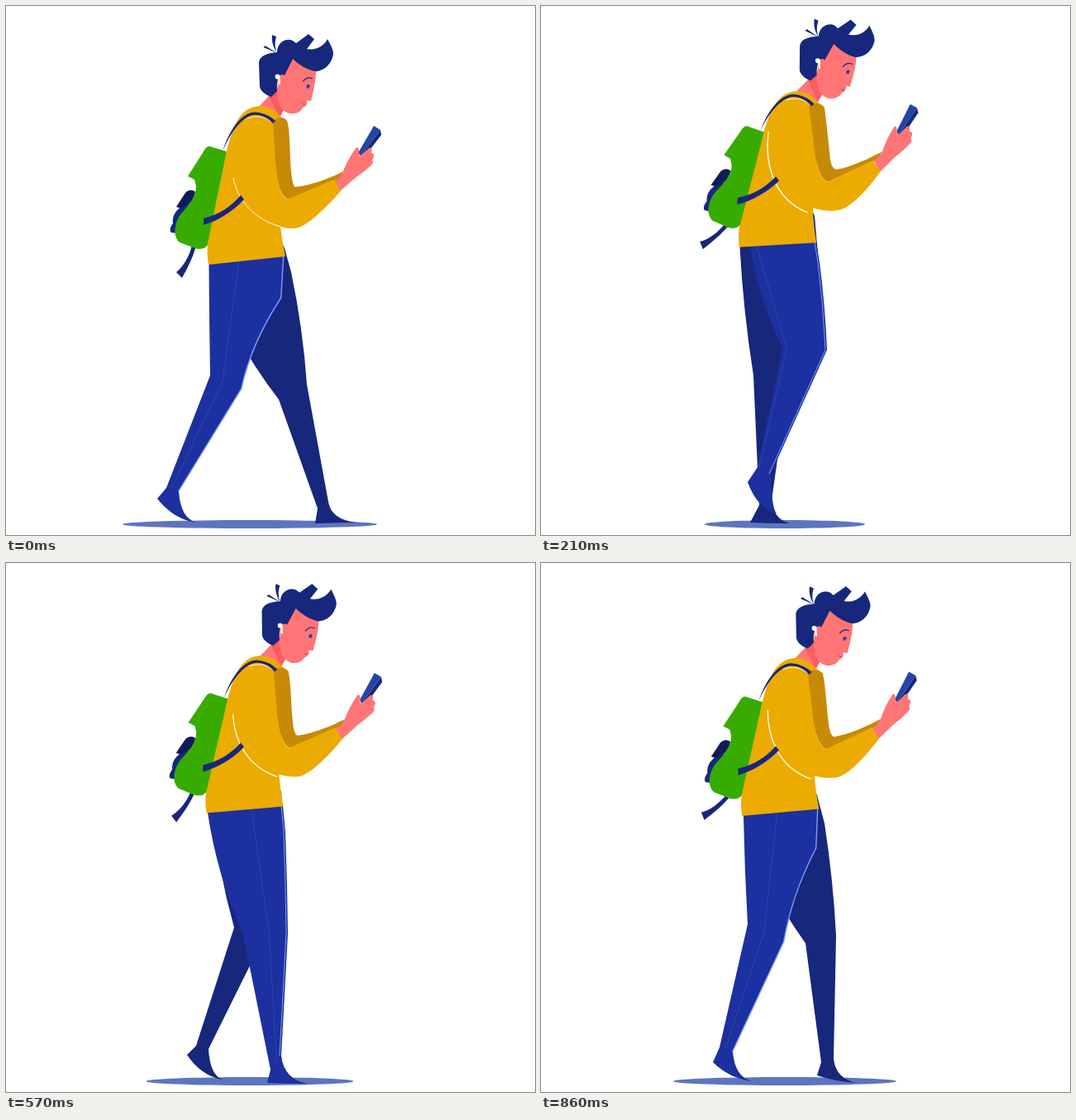
These frames come from a looping animation (640 px wide and 640 px high, 930 ms). An HTML page with a canvas:

```html
<!DOCTYPE html>
<html lang="en">
<head>
<meta charset="utf-8">
<title>Walking with a phone</title>
<style>
  html, body { margin: 0; width: 100%; height: 100%; overflow: hidden; background: #fff; }
  canvas { display: block; width: 100vw; height: 100vh; }
</style>
</head>
<body>
<canvas id="stage" width="640" height="640"></canvas>
<script>
const ctx = document.getElementById('stage').getContext('2d');

const LOOP = 930, STEPS = 13, HALF = STEPS / 2;
const starts = [0, 70, 140, 210, 290, 360, 430, 500, 570, 640, 710, 790, 860];

const NAVY = '#17277b', BLUE = '#1c309f', SEAM = '#2843a9', LIGHT = '#7d9dff';
const YELLOW = '#ebab00', OCHRE = '#c68a06', SKIN = '#ff7576', BLUSH = '#ff5b5d';
const GREEN = '#38ab00', PHONE = '#2445a6', DARK = '#101c5a', SHADOW = '#5c75bf';

const mix = (a, b, t) => a + (b - a) * t;
const nums = text => text.split(/[ ,]+/).map(Number);

// Linear interpolation over [time, values] keys.
function track(keys, time) {
  const i = Math.max(1, keys.findIndex(k => k[0] >= time));
  const [t0, a] = keys[i - 1], [t1, b] = keys[i];
  return a.map((v, n) => mix(v, b[n], (time - t0) / (t1 - t0)));
}

function fill(path, color) {
  ctx.fillStyle = color;
  ctx.fill(new Path2D(path));
}

function stroke(path, color, width) {
  ctx.strokeStyle = color;
  ctx.lineWidth = width;
  ctx.lineCap = ctx.lineJoin = 'round';
  ctx.stroke(new Path2D(path));
}

function group(dx, dy, angle, cx, cy, draw) {
  ctx.save();
  ctx.translate(cx + dx, cy + dy);
  ctx.rotate(angle);
  ctx.translate(-cx, -cy);
  draw();
  ctx.restore();
}

// Blends two paths that share the same commands.
function morph(a, b, t) {
  const other = b.match(/[\d.]+/g);
  let i = 0;
  return a.replace(/[\d.]+/g, n => mix(+n, +other[i++], t).toFixed(2));
}

// Pose: back hip, back knee, back ankle, heel, toe, front ankle, front knee,
// front thigh, front hip, then the position of the seam across the leg.
const trailing = nums('245.5,313 247,447 194,583 183,596 230,625 209,587 285,463 333,353 336,303 .4');
const leading = nums('246,313 330,476 377,608 374,626 424,625 390,600 364,458 345,322 337,293 .43');

const nearLeg = [
  [0, trailing],
  [1, nums('244,306 261,437 217,577 206,588 243,622 232,580 304,451 333,333 334,297 .32')],
  [3, nums('253,291 292,415 262,558 250,576 285,614 278,566 346,416 337,310 333,286 .1')],
  [5, nums('247,302 308,446 317,578 311,607 356,626 332,577 359,430 341,312 336,291 .29')],
  [HALF, leading],
  [8, nums('244,302 287,450 320,613 316,629 365,630 333,596 341,448 338,326 335,294 .58')],
  [10, nums('243,291 255,424 261,612 258,625 307,627 280,585 310,446 333,326 333,286 .55')],
  [12, nums('245,306 250,437 216,586 208,604 255,627 232,591 294,458 333,345 335,297 .45')],
  [STEPS, trailing]
];

const farLeg = [
  [0, leading],
  [1, nums('245,306 305,470 340,611 335,629 386,629 353,603 343,458 341,330 335,287 .4')],
  [3, nums('240.5,291 257,447 264,604 253,625 302,626 279,598 300,450 335,300 331,254 .4')],
  [5, nums('245,302 252,447 229,596 217,609 267,628 242,600 305,420 333,340 335,285 .4')],
  [HALF, trailing],
  [8, nums('250,302 276,441 230,584 219,595 262,625 245,588 305,467 336,320 333,277 .4')],
  [10, nums('247,291 290,440 262,582 255,588 295,620 281,582 343,437 340,325 331,262 .4')],
  [12, nums('246,306 320,460 339,604 334,620 383,629 354,600 357,451 343,315 334,281 .4')],
  [STEPS, leading]
];

const armReach = [[0, [0]], [1, [.21]], [1.5, [.41]], [3, [1]], [3.5, [1]], [5, [.84]], [5.5, [.64]], [HALF, [0]]];
const tailSwing = [[0, [0]], [1, [5.6]], [3, [21]], [5, [16.6]], [HALF, [5]], [8, [7]], [10, [21]], [12, [23]], [STEPS, [0]]];

function drawLeg(keys, step, color, detailed) {
  const v = track(keys, step);
  const [hipB, kneeB, ankleB, heel, toe, ankleF, kneeF, thigh, hipF] =
    Array.from({ length: 9 }, (_, i) => [v[2 * i], v[2 * i + 1]]);
  const bow = (a, b, k) => [(a[0] + b[0]) / 2 - k, (a[1] + b[1]) / 2];
  const tilt = toe[1] - heel[1];
  const sole = [(heel[0] + toe[0]) / 2 - tilt * .15, (heel[1] + toe[1]) / 2 + tilt * .35];
  const instep = [mix(ankleF[0], toe[0], .1), mix(ankleF[1], toe[1], .85)];
  const backBow = bow(hipB, kneeB, (kneeB[0] - hipB[0]) * .25);
  const frontBow = bow(kneeF, thigh, (thigh[0] - kneeF[0]) * .25);

  fill(`M${hipB} Q${backBow} ${kneeB} L${ankleB} L${heel} Q${sole} ${toe}
    Q${instep} ${ankleF} L${kneeF} Q${frontBow} ${thigh} L${hipF}
    L${hipF[0] - 6},${hipF[1] - 14} L${hipB[0] + 4},${hipB[1] - 14}Z`, color);
  if (!detailed) return;

  const across = (a, b) => [mix(a[0], b[0], v[18]), mix(a[1], b[1], v[18])];
  stroke(`M${across(hipB, hipF)} L${across(kneeB, kneeF)} L${across(ankleB, ankleF)}`, SEAM, 1.2);
  const inset = kneeF[0] > thigh[0] ? -2 : -.3;
  group(inset, 0, 0, 0, 0, () =>
    stroke(`M${hipF} L${thigh} Q${frontBow} ${kneeF} L${ankleF}`, LIGHT, inset < -1 ? 1 : 1.4));
}

function drawHead() {
  fill('M328 98 L305 123 L331 136 L338 121Z', SKIN);
  fill('M328 100 L318 110 C323 118 327 127 331 134 L337 124 C331 118 329 108 328 100Z', BLUSH);
  fill(`M330 82 L347 63 L375 78 C375 93 371 106 369 115 L364 114 C365 118 363 122 359 123
    C356 130 347 131 343 130 C336 128 329 122 328 104Z`, SKIN);
  fill(`M321 110 C312 107 307 101 307 97 L306 70 C306 60 316 57 328 56 C328 44 339 38 347 42
    L351 45 L366 34 L373 40 L364 52 C375 54 384 49 389 40 C392 46 396 52 396 58
    C394 71 384 79 374 79 C364 77 354 71 347 64 L337 84 C331 80 327 88 328 103Z`, NAVY);
  fill('M322 35 L327 37 C325 44 325 50 328 57 C323 50 321 42 322 35Z', NAVY);
  fill('M311.5 50 L313.5 48 L328 57Z', NAVY);
  fill('M325.5 85.5 a3 3 0 1 1 6 0 L332 95 L329.8 95 L329.3 88.4 A3 3 0 0 1 325.5 85.5Z', '#fff');
  fill('M363.4 97.4 C363.5 94.5 367.5 93.8 367.6 96.5 C367.4 100.5 363.5 100.8 363.4 97.4Z', PHONE);
  stroke('M359.5 91 Q364 85 370.5 87.5', NAVY, 1.2);
  stroke('M358.5 118 Q360 120 362.5 119', '#c8435e', 1);
}

function drawBackpack(swing) {
  group(0, 0, swing * Math.PI / 180, 228, 290, () =>
    fill('M225 289 C222 303 214 316 206 322 L213 329 C219 318 226 305 230 290Z', NAVY));
  fill('M212 243 C203 249 201 257 202 263 C198 268 198 273 200 274 L206 275 L224 238Z', NAVY);
  fill('M206 243 L217 226 C221 222 226 222 229 225 L226 236 L212 245Z', DARK);
  fill(`M247 170 L267 176 L244 288 C242 295 232 295 226 292 L210 286 C201 278 204 261 212 251
    C222 240 230 230 230 218 L228 210 L220 206 L239 176 C241 172 244 169 247 170Z`, GREEN);
  fill('M239 257 C258 252 272 243 284 229 L288 234 C274 249 256 260 239 265Z', NAVY);
  stroke('M292 136 Q307 130 320 139', '#fff1c4', 1);
  fill(`M262.5 175 C270 150 285 129 301 128.5 C311 129 320 133 326 139 L323 142
    C315 133 305 131 299 132 C286 134 272 152 262.5 175Z`, NAVY);
}

function drawHand() {
  fill('M445 145 L453 150 L436 172 L429 181 L427 179 L427 176Z', PHONE);
  fill('M453 150 L454 156 L441 173 L429 181Z', NAVY);
  fill(`M396 210 L407 202 C412 190 416 182 424 171 C428 170 427 176 427 181 L430 180
    L439 172 C443 170 443 174 442 178 C446 178 446 183 443 186 C446 191 440 194 438 196
    C430 203 422 208 419 211 L404 224Z`, SKIN);
}

function drawArms(reach) {
  fill(morph(
    `M323 140 C328 134 336 133 340 139 C344 150 343 180 345 200 C346 212 348 219 350 219
     C370 217 395 207 408 200 L404 208 L397 211 L341 234 C333 230 328 215 326 190 C325 170 324 155 323 140Z`,
    `M321 138.5 C327 133 335 133.5 340 140 C343 156 346 176 349 196 C350 206 353.5 213 357.5 213.5
     C375.5 210 398 197.5 412.5 189 L408 196 L403 200.5 L348.5 229 C340 226.5 333.5 212 329.5 187 C326.5 167 323.5 152 321 138.5Z`,
    reach), OCHRE);
  fill(morph(
    `M340 234 L397 210 L405 224 C385 246 364 267 350 269 C334 270 306 262 288 236
     C280 226 276 215 275 205 L300 150 L326 190 C328 215 333 230 340 234Z`,
    `M348 229 L401 200.5 L411.5 213 C397 236 378 258 365 262 C349 266 328 265 302 246
     C286 234 276 209 274 185 L300 150 L329 187 C333.5 212 340 226.5 348 229Z`,
    reach), YELLOW);
  stroke(morph('M275 208 C280 235 300 258 332 267', 'M273.5 172 C271 205 280 251 325 267', reach),
    '#fffaf0', mix(1, 1.5, reach));
}

function drawBody(step, lift) {
  const [reach] = track(armReach, step % HALF);
  const [swing] = track(tailSwing, step);
  group(-5 * lift, -19 * lift, .048 * lift, 291.5, 308, () => {
    group(.6 * lift, -2.3 * lift, 0, 0, 0, drawHead);
    group(4.6 * reach, -11 * reach, -.11 * reach, 408, 200, drawHand);
    fill(`M245 313 C243 300 243 288 246 278 L267 176 C274 148 281 123 306 121
      C319 121 326 127 331 133 L340 139 L332 225 L332 267 L335 288 L338 303Z`, YELLOW);
    drawArms(reach);
    group(1.2 * lift, -3.5 * lift, 0, 0, 0, () => drawBackpack(swing));
  });
}

function render(time) {
  const step = starts.filter(s => s <= time).length - 1;
  const phase = step % HALF;
  const rise = Math.min(phase, HALF - phase);

  ctx.fillStyle = '#fff';
  ctx.fillRect(0, 0, 640, 640);
  ctx.fillStyle = SHADOW;
  ctx.beginPath();
  ctx.ellipse(295, 627, 154 - 19 * rise, 5, 0, 0, 2 * Math.PI);
  ctx.fill();

  drawLeg(farLeg, step, NAVY, false);
  drawLeg(nearLeg, step, BLUE, true);
  drawBody(step, rise / 3);
}

const origin = performance.now();
function tick() {
  render((performance.now() - origin) % LOOP);
  requestAnimationFrame(tick);
}
tick();
</script>
</body>
</html>
```
